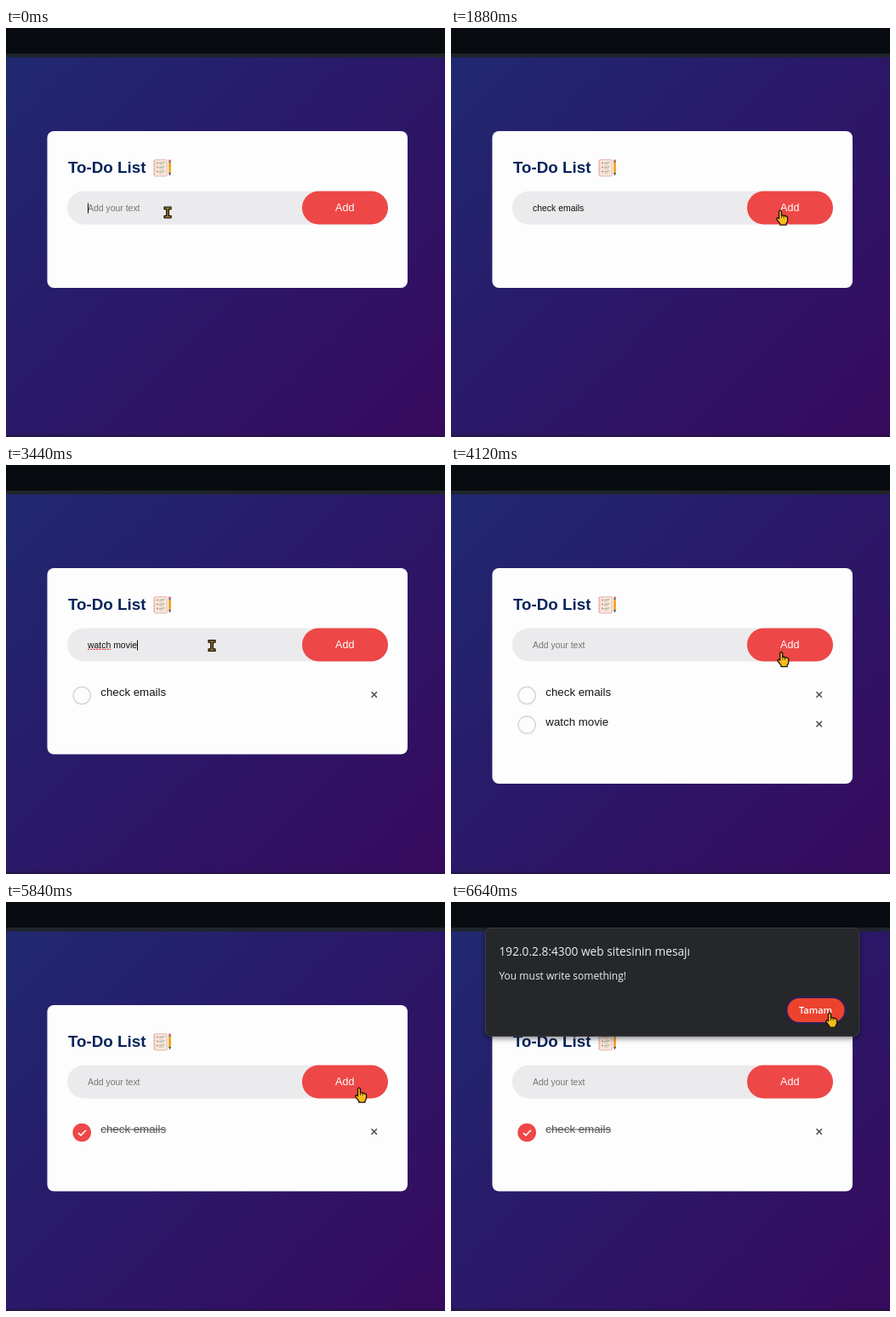
Animation, 516 px wide and 480 px high, one loop 6680 ms. Source, as an HTML page with a canvas:

```html
<!DOCTYPE html>
<html lang="en">
<head>
<meta charset="utf-8">
<title>To-Do List</title>
<style>
html, body { margin: 0; width: 100%; height: 100%; overflow: hidden; background: #2b1766; }
canvas { display: block; }
</style>
</head>
<body>
<canvas id="stage" width="516" height="480"></canvas>
<script>
const ctx = document.getElementById('stage').getContext('2d');
const LOOP = 6680;
const SANS = '"Liberation Sans", Arial, sans-serif';
const UI = '"Open Sans", "Noto Sans", sans-serif';
const RED = '#ee4747', ROW = 34.5;

// Pointer hotspot: time, x, y
const path = [
  [0, 190, 216.5], [1320, 190, 216.5], [1660, 387, 214], [2060, 387, 214],
  [2520, 242, 212], [3470, 242, 212], [3800, 388, 214], [4080, 388, 214],
  [4280, 390, 264], [4560, 390, 264], [4840, 390, 310], [5000, 432, 304],
  [5200, 432, 304], [5600, 415, 218], [6120, 415, 218], [6500, 445, 130], [LOOP, 445, 130]
];

const clamp = (v, a, b) => Math.max(a, Math.min(b, v));
const ease = k => k * k * (3 - 2 * k);

function pointerAt(t) {
  let i = 1;
  while (i < path.length - 1 && path[i][0] < t) i++;
  const [t0, x0, y0] = path[i - 1], [t1, x1, y1] = path[i];
  const k = ease(clamp((t - t0) / (t1 - t0), 0, 1));
  return [x0 + (x1 - x0) * k, y0 + (y1 - y0) * k];
}

function box(x, y, w, h, r, fill, stroke, lw = 1) {
  ctx.beginPath();
  ctx.roundRect(x, y, w, h, r);
  if (fill) { ctx.fillStyle = fill; ctx.fill(); }
  if (stroke) { ctx.strokeStyle = stroke; ctx.lineWidth = lw; ctx.stroke(); }
}

function disc(x, y, r, fill, stroke, lw) {
  box(x - r, y - r, 2 * r, 2 * r, r, fill, stroke, lw);
}

function line(points, color, lw) {
  ctx.beginPath();
  points.forEach(([x, y]) => ctx.lineTo(x, y));
  ctx.strokeStyle = color;
  ctx.lineWidth = lw;
  ctx.stroke();
}

function label(s, x, y, font, color, align = 'left') {
  ctx.font = font;
  ctx.fillStyle = color;
  ctx.textAlign = align;
  ctx.fillText(s, x, y);
  return ctx.measureText(s).width;
}

function outlined(d, fill) {
  const p = new Path2D(d);
  ctx.fillStyle = fill;
  ctx.fill(p);
  ctx.strokeStyle = '#17130c';
  ctx.lineWidth = 1.3;
  ctx.stroke(p);
}

function backdrop() {
  const g = ctx.createLinearGradient(18, 17, 498, 498);
  g.addColorStop(0, 'rgb(32,41,112)');
  g.addColorStop(0.5, 'rgb(43,24,104)');
  g.addColorStop(1, 'rgb(56,10,94)');
  ctx.fillStyle = g;
  ctx.fillRect(0, 0, 516, 480);
  box(0, 0, 516, 30, 0, '#080c10');
  box(0, 30, 516, 4.5, 0, '#20252b');
  box(0, 477, 516, 3, 0, 'rgba(35,20,62,.6)');
}

function notepad() {
  ctx.save();
  ctx.translate(173, 153.5);
  box(1, 1, 15.5, 19.5, 1.5, '#f6d9d0', '#e3b8ad', 0.8);
  box(3, 2.5, 12, 16.5, 0, '#f8e9df');
  for (let i = 0; i < 3; i++) {
    const y = 5 + i * 5;
    box(4, y - 1, 2, 2, 0, '#d98f86');
    line([[7, y], [13.5, y - 0.7]], '#8fa98c', 1);
    line([[7, y + 2], [12, y + 1.6]], '#c9b7a5', 0.8);
  }
  for (let i = 0; i < 6; i++) disc(1, 3 + i * 3, 0.7, '#c7a49b');
  box(18, 4, 3, 12.5, 0, '#f0a92c');
  box(18, 1, 3, 2.2, 1, '#e0646a');
  box(18, 3, 3, 1.3, 0, '#55798f');
  ctx.fillStyle = '#3c4a5c';
  ctx.beginPath();
  ctx.moveTo(18, 16.5);
  ctx.lineTo(21, 16.5);
  ctx.lineTo(19.5, 20);
  ctx.fill();
  ctx.restore();
}

function inputField(t) {
  box(72, 191.5, 377, 39, 19.5, '#ebebed');
  const first = t < 1960, second = t >= 2640 && t < 4000;
  let typed = '';
  if (first) typed = 'check emails'.slice(0, clamp(Math.floor((t - 120) / 100), 0, 12));
  if (second) typed = 'watch movie'.slice(0, clamp(Math.floor((t - 2640) / 68), 0, 11));
  const font = '10.45px ' + SANS;
  const w = label(typed || 'Add your text', 96, 215, font, typed ? '#111' : '#757575');
  const focus = t < 1800 || (t >= 2540 && t < 3880);
  if (focus) {
    const x = typed ? 96 + w : 96;
    box(Math.round(x), 205.5, 1, 12, 0, '#111');
    if (typed.length > 5) {
      const end = 96 + ctx.measureText(typed.slice(0, 5)).width;
      ctx.setLineDash([2, 1.3]);
      line([[96, 216.3], [end, 216.3]], '#e2353a', 1.2);
      ctx.setLineDash([]);
    }
  }
  box(348, 191.5, 101, 39, 19.5, RED);
  label('Add', 398.2, 215, '12.6px ' + SANS, '#fff', 'center');
}

function task(text, row, done, hover) {
  const y = 270.5 + row * ROW;
  if (done) {
    disc(89.2, y, 10.8, RED);
    line([[85, y + 0.6], [88, y + 3.4], [94, y - 2.8]], '#fff', 1.6);
  } else {
    disc(89.2, y, 10.1, '#fdfdfd', '#dadada', 1.6);
  }
  const w = label(text, 111.3, y + 0.7, '13.3px ' + SANS, done ? '#555' : '#161616');
  if (done) box(111.3, y - 4, w, 1, 0, '#555');
  if (hover) disc(432.7, y - 1, 15.7, '#edeef0');
  const cy = y - 1, r = 3.2;
  line([[432.7 - r, cy - r], [432.7 + r, cy + r]], '#505050', 1.6);
  line([[432.7 + r, cy - r], [432.7 - r, cy + r]], '#505050', 1.6);
}

function dialog(t) {
  ctx.save();
  ctx.globalAlpha = clamp((t - 5960) / 90, 0, 1);
  ctx.shadowColor = 'rgba(0,0,0,.55)';
  ctx.shadowBlur = 7;
  ctx.shadowOffsetY = 2;
  box(40.5, 30.5, 439.5, 127, 7, '#25272a');
  ctx.shadowColor = 'transparent';
  box(40.5, 30.5, 439.5, 127, 7, null, '#3b3e42');
  label('192.0.2.8:4300 web sitesinin mesajı', 56.5, 63, '13.7px ' + UI, '#eef0f2');
  label('You must write something!', 56.5, 91, '12px ' + UI, '#eef0f2');
  box(393.5, 110.8, 71, 32.4, 16.2, '#2b2055');
  box(395.5, 113, 67, 28, 14, '#ec432f');
  label('Tamam', 428.5, 131, '600 11px ' + UI, '#fff', 'center');
  ctx.restore();
}

function pointer(x, y, kind) {
  ctx.save();
  ctx.lineJoin = 'round';
  ctx.translate(x, y);
  if (kind === 'beam') {
    outlined('M-4 -6.3H4V-3.8H1.3V3.8H4V6.3H-4V3.8H-1.3V-3.8H-4Z', '#a9842f');
  } else if (kind === 'hand') {
    outlined('M-1.5 1.2Q0 -.8 1.5 1.2V6Q3 5 4.2 6.4Q5.6 5.6 6.6 7Q8.4 6.6 8.6 8.6V12' +
      'Q8.4 14.4 7 15.4V17.2H-.2V15.6L-4 10.8Q-4.8 9 -3 8.6L-1.5 9.8Z', '#f6bd1b');
    line([[1.6, 6], [1.6, 9]], '#17130c', 0.8);
    line([[4.2, 6.6], [4.2, 9.2]], '#17130c', 0.8);
  } else {
    outlined('M0 0L0 14.5L3.6 11.2L6 16L8.2 15L6 10.4L10.4 10.2Z', '#f6bd1b');
  }
  ctx.restore();
}

function pointerKind(x, y, t, rows) {
  if (t >= 5960) {
    const onOk = x > 396 && x < 462 && y > 113 && y < 141;
    return t < 6120 || onOk ? 'hand' : 'arrow';
  }
  if (y > 191 && y < 231) return x < 348 ? 'beam' : 'hand';
  return y > 251 && y < 251 + rows * ROW ? 'hand' : 'arrow';
}

function draw(t) {
  const hasFirst = t >= 1960, hasSecond = t >= 4000 && t < 5120;
  const rows = hasFirst + hasSecond;
  const [x, y] = pointerAt(t);
  const overCross = row => Math.hypot(x - 432.7, y - 269.5 - row * ROW) < 15.7;
  backdrop();
  box(48.5, 121, 423.5, 184 + rows * ROW, 7.8, '#fdfdfd');
  label('To-Do List', 73, 170, 'bold 18.8px ' + SANS, '#07235b');
  notepad();
  inputField(t);
  if (hasFirst) task('check emails', 0, t >= 4380, overCross(0));
  if (hasSecond) task('watch movie', 1, false, overCross(1));
  if (t >= 5960) dialog(t);
  pointer(x, y, pointerKind(x, y, t, rows));
}

const start = performance.now();
function tick() {
  draw((performance.now() - start) % LOOP);
  requestAnimationFrame(tick);
}
tick();
</script>
</body>
</html>
```
